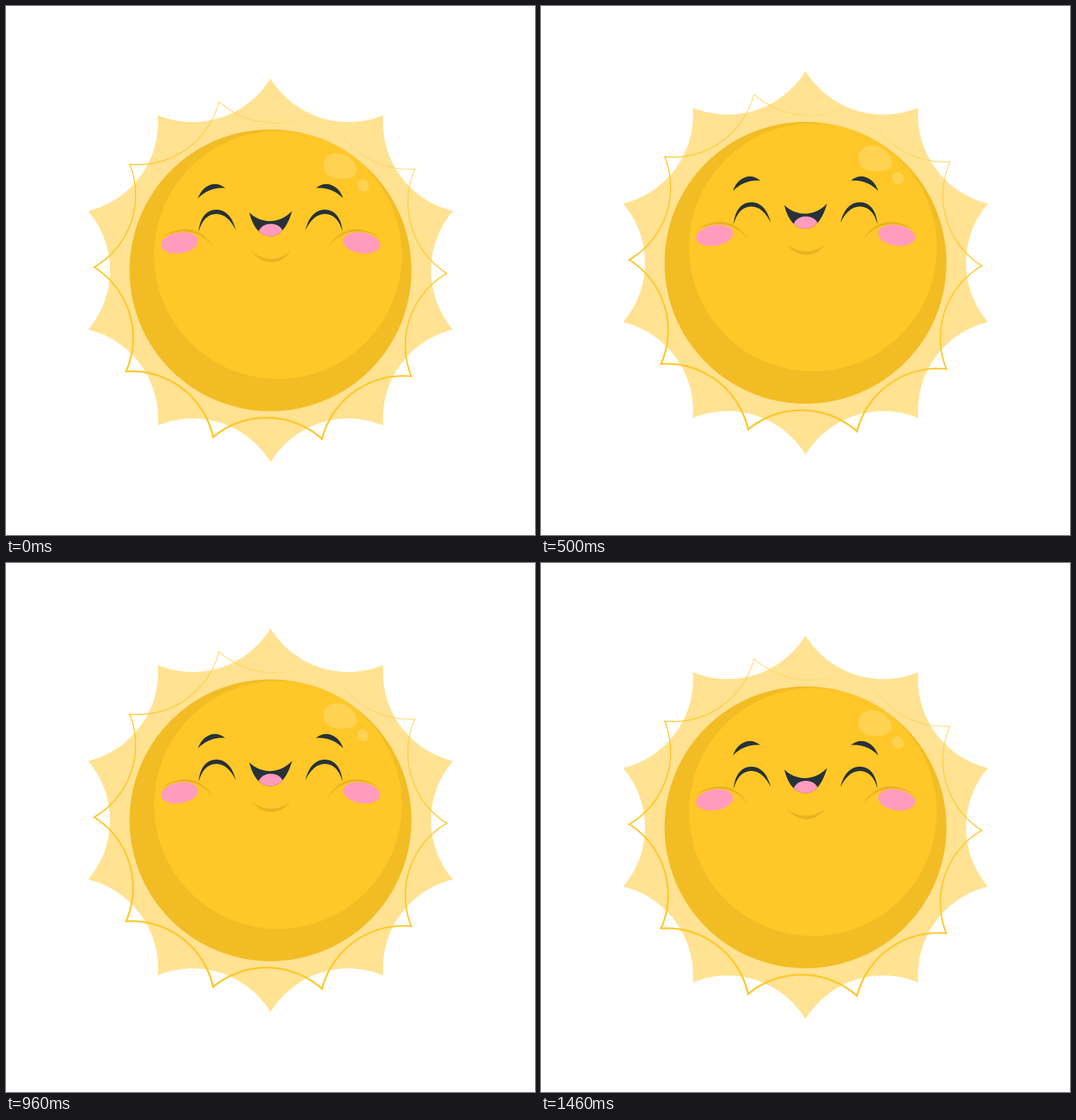
Recreate the animation shown at these times as an HTML page with a canvas. Size 748 by 748 pixels, loop 1500 ms.

```html
<!DOCTYPE html>
<html lang="en">
<head>
<meta charset="utf-8">
<title>Smiling sun</title>
<style>
  html, body { margin: 0; width: 100%; height: 100%; overflow: hidden; background: #fff; }
  canvas { display: block; width: 748px; height: 748px; }
</style>
</head>
<body>
<canvas id="stage" width="748" height="748"></canvas>
<script>
const ctx = document.getElementById('stage').getContext('2d');
const LOOP = 1500, FRAMES = 36, PEAK = 17, LIFT = 15;
const CX = 374, CY = 373.7, MIRROR = 748.3;
const STEP = Math.PI / 5;
const GOLD = '#ffc727', DARK = '#263238', PINK = '#ff9bbd', CREASE = '#e6b323';

// Ten-pointed outline made of arcs of radius `arc`, centred `dist` away from the middle.
function scallop(dist, arc, turn, widthAt) {
  const path = new Path2D(), count = 720;
  for (const side of widthAt ? [1, -1] : [0]) {
    for (let i = 0; i < count; i++) {
      const local = (i / count * 10 % 1 - 0.5) * STEP;
      const angle = i / count * Math.PI * 2 + turn;
      const depth = Math.sqrt(arc ** 2 - (dist * Math.sin(local)) ** 2);
      let r = dist * Math.cos(local) - depth;
      if (side) r += side * widthAt(angle) / 2 * arc / depth;
      const x = CX + r * Math.cos(angle), y = CY + r * Math.sin(angle);
      if (i) path.lineTo(x, y); else path.moveTo(x, y);
    }
    path.closePath();
  }
  return path;
}

const rays = scallop(356, 129, -Math.PI / 2, null);
const rim = scallop(326.5, 118, Math.PI / 180,
  angle => 2.6 * Math.abs(Math.cos((angle - 1.885) / 2)));

const brow = new Path2D('M271.5 272C277 254 296 245 310 257.5C295 256 281 262 271.5 272Z');
const eye = new Path2D('M272.5 319C274 299 284 288 297 288C311 288 320 298 325 317C318 303 309 294 297.5 294C285 294 277 303 272.5 319Z');
const cheekFold = new Path2D('M218 329C238 313 272 306 293 341C271 312 239 316 218 329Z');
const mouth = new Path2D('M344 292C360 308 386 309 404.5 290C398 312 388 325.5 374 325.5C359 325.5 349 312 344 292Z');
const chin = new Path2D('M347 347C363 361 388 361 403 346C389 367 364 368 347 347Z');
const shine = new Path2D('M449 227C449 214 457 208 468 208C484 208 497 222 496 234C495 241 486 244.5 473 244.5C459 244 449 238 449 227ZM504 245C510 245 514 252 513 257C511 262 507 263 503 262C498 260 496 256 497 250C498 246 501 245 504 245Z');

function fill(path, color, rule = 'nonzero') {
  ctx.fillStyle = color;
  ctx.fill(path, rule);
}

function ellipse(x, y, rx, ry, color, tilt = 0) {
  const path = new Path2D();
  path.ellipse(x, y, rx, ry, tilt, 0, Math.PI * 2);
  fill(path, color);
}

function halfFace() {
  fill(brow, DARK);
  fill(eye, DARK);
  fill(cheekFold, CREASE);
  ellipse(245.5, 335, 26.5, 14.6, PINK, -0.157);
}

function drawSun() {
  fill(rays, '#ffe292');
  fill(rim, GOLD, 'evenodd');
  ellipse(CX, CY, 199.3, 199.3, '#f2bc24');
  ellipse(384.5, 352, 175.3, 175.3, GOLD);
  fill(shine, '#ffd252');

  halfFace();
  ctx.save();
  ctx.translate(MIRROR, 0);
  ctx.scale(-1, 1);
  halfFace();
  ctx.restore();

  fill(chin, CREASE);
  fill(mouth, DARK);
  ctx.save();
  ctx.clip(mouth);
  ellipse(374.5, 322, 17.5, 14, PINK);
  ctx.restore();
}

// The sun rises and sinks at an even pace, 24 steps per second.
function liftAt(ms) {
  const frame = Math.floor((ms + 2) * FRAMES / LOOP) % FRAMES;
  return frame <= PEAK
    ? LIFT * frame / PEAK
    : LIFT * (FRAMES - 1 - frame) / (FRAMES - 1 - PEAK);
}

function render() {
  ctx.fillStyle = '#fff';
  ctx.fillRect(0, 0, 748, 748);
  ctx.save();
  ctx.translate(0, -liftAt(performance.now() % LOOP));
  drawSun();
  ctx.restore();
  requestAnimationFrame(render);
}
render();
</script>
</body>
</html>
```
